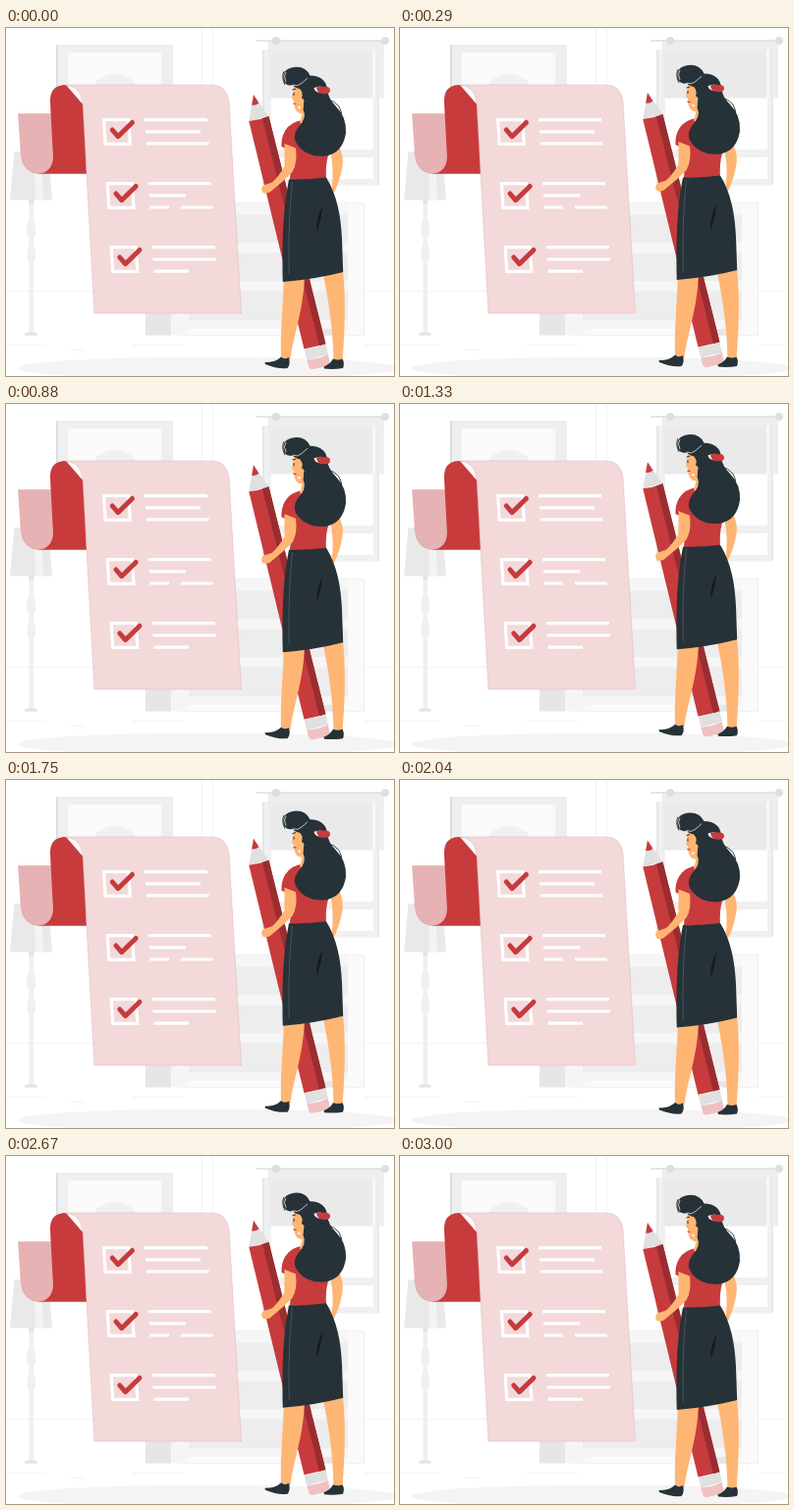
An HTML page for the animation above (3.04 s loop, 395 by 355 pixels).

```html
<!DOCTYPE html>
<html lang="en">
<head>
<meta charset="utf-8">
<title>Checklist</title>
<style>
html, body { margin: 0; width: 100%; height: 100%; overflow: hidden; background: #fff; }
svg { display: block; width: 395px; height: 355px; }
.red { fill: #c73b3d; }
.dark { fill: #263238; }
.skin { fill: #ffb573; }
</style>
</head>
<body>
<svg viewBox="0 0 395 355">
  <defs>
    <g id="box" fill="none">
      <path d="M99.7 93.7H124.8L126.3 118.3H101.2Z" stroke="#fff" stroke-width="3.2"/>
      <path d="M108.3 104L114 110.7L128.5 96.5" stroke="#c73b3d" stroke-width="5" stroke-linecap="round" stroke-linejoin="round"/>
    </g>
  </defs>

  <!-- room -->
  <g stroke="#f3f3f3" stroke-width="1" fill="none">
    <path d="M199.5 0V58M210.5 0V58M0 268.5H395M0 323.5H40M66 328.5H80M128 323.5H180M364 323.5H392"/>
  </g>
  <path d="M51 17H170V100H51Z" fill="#efefef"/>
  <path d="M51 17H53V100H51Z" fill="#dedede"/>
  <path d="M63 25H158V100H63Z" fill="#fafafa"/>
  <ellipse cx="111" cy="69" rx="25" ry="22" fill="#f0f0f0"/>

  <path d="M261 22H380V160.500H261ZM270 27V124H374V27ZM270 132V154H374V132Z" fill="#f0f0f0" fill-rule="evenodd"/>
  <path d="M261 22H263V160H261ZM378.500 71H380V160H378.500Z" fill="#e6e6e6"/>
  <path d="M267 13H385V71.500H267Z" fill="#ebebeb" opacity=".85"/>
  <path d="M270 27H374V71.500H270Z" fill="#e8e8e8" opacity=".6"/>
  <path d="M374.500 22V71" stroke="#f8f8f8" stroke-width="3"/>
  <path d="M255 13H386" stroke="#dedede" stroke-width="1.5"/>
  <g fill="#dedede"><circle cx="275" cy="13" r="4"/><circle cx="386" cy="13" r="4"/></g>

  <path d="M182 178.500H364.500V313.500H182Z" fill="#fafafa" stroke="#f0f0f0"/>
  <path d="M182 179H348V307H182Z" fill="#f6f6f6"/>
  <path d="M186 190.500H348V219H186ZM186 229.500H348V258H186ZM186 268.500H348V298H186Z" fill="#ededed"/>
  <path d="M168 291H186V298H200L182 313.500H168Z" fill="#f5f5f5"/>
  <path d="M142 288H168V313.500H142ZM322 307H333V313.500H322Z" fill="#e6e6e6"/>

  <path d="M23.500 175H28V195Q31 200 30 212H28V220Q31 226 29.500 238H28V310Q32 310 32 313.500H19Q19 310 23.500 310V238H22Q20.500 226 23.500 220V212H21.500Q20.500 200 23.500 195Z" fill="#f0f0f0"/>
  <path d="M23.500 175H28V179H23.500ZM19 313.500Q19 310.500 25.500 310.500T32 313.500Z" fill="#e2e2e2"/>
  <path d="M8.500 126H43L47 175.500H4Z" fill="#e9e9e9"/>
  <path d="M29 126H36L38 175.500H30Z" fill="#f3f3f3"/>
  <ellipse cx="205" cy="347" rx="193" ry="11.500" fill="#f4f4f4"/>

  <!-- scroll -->
  <path d="M12.500 87.500H47L49 132Q48 148.500 33 148.700Q17 147 15.300 130Z" fill="#e7b2b3" stroke="#dc9899" stroke-width=".4"/>
  <path class="red" d="M45 76Q44 58 61 58L80 80L82 148.700H32Q47 148 48 132Z"/>
  <path d="M60 58H210Q225 58.500 227 75L239.500 291H90L78 76Q76 59 60 58Z" fill="#f3d9da" stroke="#dfa5a6" stroke-width=".4"/>
  <use href="#box"/><use href="#box" x="3.700" y="65"/><use href="#box" x="7.500" y="130"/>
  <path d="M141 93.700H205M142 105.800H198M143 117.900H206.500M145 158.700H209M146 170.800H183M146.500 183H166M178 183H210.500M149 223.700H213M149.500 236H214M150.500 248.200H186" stroke="#fff" stroke-width="3.200"/>

  <g id="figure">
    <!-- pencil -->
    <path d="M252 68L247.300 95L267.500 90Z" fill="#e0e0e0"/>
    <path class="red" d="M252 68L250.200 78.500Q254 79.500 257.500 76.500ZM247.300 95Q258 94 267.500 90L325.500 322.500L303.500 327.500Z"/>
    <path d="M261 92.500L267.500 90L325.500 322.500L319 324Z" fill="#992d30"/>
    <path d="M303.500 327.500Q315 326.500 325.500 322.200L328 333L306.300 338.500Z" fill="#e0e0e0"/>
    <path d="M306.300 338.500Q318 337.500 328 333L329.500 341Q330 344 326 345L313 348Q309 348.500 308.300 346Z" fill="#f1c1c2"/>

    <!-- legs -->
    <path class="skin" d="M283 252H304C303 288 293 311 289.500 338L280 336C279 310 282 285 283 252ZM322 247H343C346 275 345 310 342.500 340H333.500C333 305 328 275 322 247Z"/>
    <path class="dark" d="M263.500 341Q275 341 280 335.500Q284 338.500 288 336Q290 343 286.500 347Q276 348 264 343ZM323.500 345.500Q330 343 333 337.500Q338 339.500 342.500 337.500Q345 342 343 347Q333 348.500 324 347.500Z"/>

    <!-- body -->
    <path class="skin" d="M332 119L339 121Q344 130 342.500 141Q340 156 334 168L331.500 165Q334 148 331 130Z"/>
    <path class="red" d="M303 94Q290 95 284 105Q280 112 280.500 121L291 126L289 155H326Q325 140 328 130L338 124L334 100Z"/>
    <path class="skin" d="M283.500 118L295 122.500Q297 138 291.500 147Q282 157 271.500 165Q267 170 261.500 168Q258.500 164 262 160.500L271 157.500Q278 151 283.500 141Z"/>
    <path class="dark" d="M288 154.500Q307 155 326 152.500C337 170 341 192 342 215L343.200 249Q314 256.500 281.800 259C281 215 282 186 288 154.500Z"/>
    <path d="M291.500 157Q287 195 288.300 251" stroke="#56646a" stroke-width=".7" fill="none"/>
    <path d="M322 182Q321 197 316 208Q316 193 322 182Z" fill="#141b1f"/>

    <!-- head -->
    <path class="skin" d="M293 57Q293 64 291 72L293 74Q293 80 295 84Q298 88 301.500 87L299 97L314 98V60Z"/>
    <path class="dark" d="M283 55Q279.500 42 293 40Q305 38.500 309.500 48.500Q326 49 327 63Q328 72 336 80Q347 91 346 107Q343 127 326 130.500Q308 132.500 298 121Q290 112 297 102Q307 92 302.500 83Q304 76 301 71Q303 66 299 62Q294 61 292 58Q287 60 283 55Z"/>
    <path d="M292 58Q297 60 300 57Q304 54 307 51M285 55Q282 49 285 45" stroke="#fff" stroke-width=".7" fill="none"/>
    <path d="M325 72Q345 77 341 94M284 58Q280 50 283 44" stroke="#263238" stroke-width=".9" fill="none"/>
    <path class="skin" d="M299 73Q302 70 303.500 74Q303 80 299.500 79Z"/>
    <circle cx="298.500" cy="81" r="1.200" fill="#fff"/>
    <path d="M291.500 63L295 62M293 66V69" stroke="#263238" stroke-width="1" fill="none"/>
    <path d="M292.500 77L295.500 77.500" stroke="#c73b3d" stroke-width="1.200"/>
    <path d="M313.500 61L320 59.500L326 66L319 66Q314 65 313.500 61Z" fill="#fff"/>
    <path class="red" d="M316 61Q319 58.500 323 60Q330 59 330 63.500Q330 68 323 67Q317 67 316 61Z"/>
  </g>
</svg>
<script>
const LOOP = 3040, CYCLE = 3000, LIFT = 10;
const figure = document.getElementById('figure');
const start = performance.now();

// Steady rise and fall, then a short rest at the bottom.
function draw() {
  const t = Math.min((performance.now() - start) % LOOP, CYCLE);
  const y = -LIFT * (1 - Math.abs(1 - 2 * t / CYCLE));
  figure.setAttribute('transform', `translate(0 ${y.toFixed(2)})`);
  requestAnimationFrame(draw);
}
draw();
</script>
</body>
</html>
```
